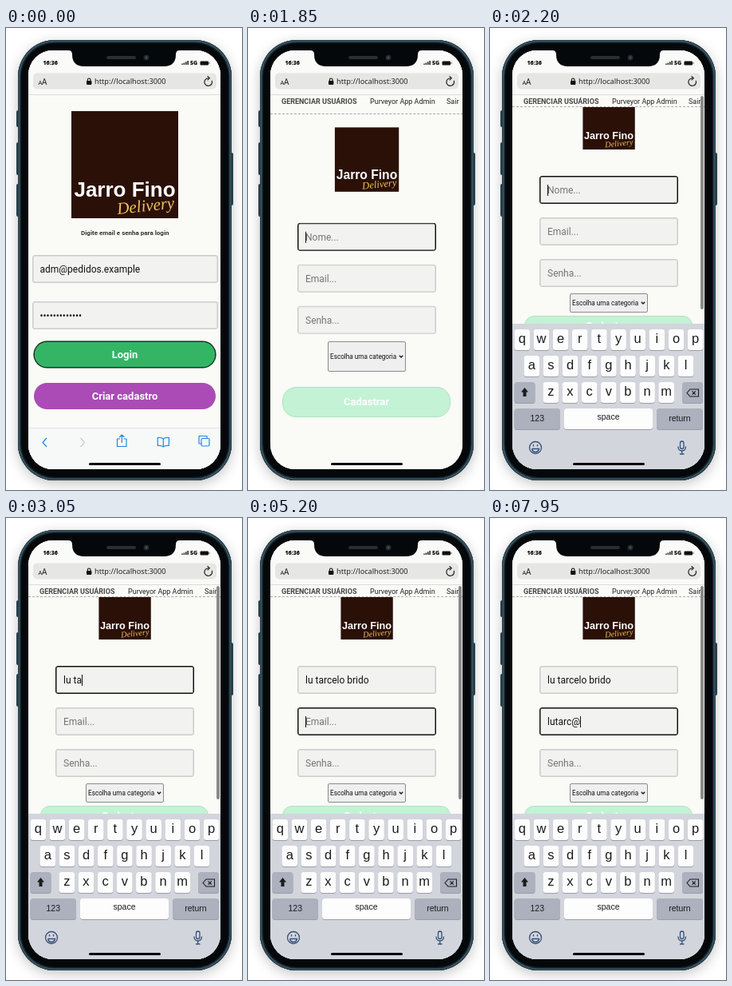
Recreate the animation shown at these times as an HTML page. Size 296 px wide and 578 px high, loop 8 s.

```html
<!DOCTYPE html>
<html lang="pt-BR">
<head>
<meta charset="utf-8">
<title>Cadastro no celular</title>
<style>
html, body { margin: 0; width: 100%; height: 100%; overflow: hidden; background: #fff; }
body { position: relative; font: 12px Roboto, sans-serif; color: #111; }
div, svg { position: absolute; box-sizing: border-box; }
svg { left: 0; top: 0; width: 296px; height: 578px; }
.side { width: 4px; background: #2c4856; border-radius: 2px; }
.body {
  left: 15px; top: 15px; width: 268px; height: 551px; border-radius: 46px; background: #05080a;
  box-shadow: inset 0 0 0 1px #2a3f4a, inset 0 0 0 2.5px #3a5664, inset 0 0 0 4px #14242c,
    0 4px 16px rgba(0, 0, 0, .24);
}
.screen {
  left: 28px; top: 28px; width: 241px; height: 524px;
  border-radius: 31px; overflow: hidden; background: #fafaf7;
}
.stage { left: -28px; top: -28px; width: 296px; height: 578px; }
.page { left: 0; top: 0; width: 296px; height: 578px; background: #fafaf7; }
.text { white-space: pre; line-height: 14px; }
.field {
  --line: #cbcbcd;
  height: 35px; padding-left: 9px; line-height: 34px; white-space: pre;
  border: 1px solid var(--line); border-radius: 3px; background: #f2f2f0;
  box-shadow: inset 0 0 0 .5px var(--line);
}
.wide { left: 32.5px; width: 233px; }
.form .field { left: 62px; width: 174px; }
.field.focus { --line: #111; }
.hint { color: #757575; }
.caret { display: none; border-left: 1px solid #111; margin-right: -1px; height: 14px; vertical-align: -3px; }
.caret.on { display: inline-block; }
.button {
  display: flex; align-items: center; justify-content: center;
  font-weight: 700; font-size: 13px; color: #fff; border-radius: 17px;
}
.login {
  left: 35px; top: 392px; width: 228px; height: 33px; background: #33b565;
  box-shadow: 0 0 0 .6px #111, inset 0 0 0 .7px #111;
}
.create { left: 35px; top: 444px; width: 228px; height: 33px; background: #aa4bb6; }
.save { left: 43px; width: 211px; background: #c3f2d4; border: 1px solid #b0e3c2; overflow: hidden; }
.select {
  left: 100px; width: 98px; padding-left: 2px; display: flex; align-items: center;
  font-size: 8.2px; white-space: nowrap; border: 1px solid #8b8b8b; border-radius: 2px; background: #efefef;
}
.nav {
  left: 28px; top: 84px; width: 242px; background: #fafaf7;
  border-bottom: 1px dashed #aaa; font-size: 9px; color: #222;
}
.bar { left: 264px; top: 85px; width: 4px; border-radius: 2px; background: #8b8b8b; }

/* one percent is 80 ms */
.page.first, .login, .tools, .keys, .nav, .bar, .form, .select, .save, .brand {
  animation: 8s linear infinite;
}
.page.first { animation-name: leave; }
.login { animation-name: press; }
.tools { animation-name: drop; }
.keys { animation-name: rise; }
.nav { animation-name: nav; }
.bar { animation-name: bar; }
.form { animation-name: form; }
.select { animation-name: select; }
.save { animation-name: save; }
.brand { animation-name: brand; }
@keyframes leave { 0%, 17.49% { visibility: visible } 17.5%, 100% { visibility: hidden } }
@keyframes press { 0%, 10% { background: #33b565 } 11.2%, 100% { background: #70c98f } }
@keyframes drop { 0%, 22.5% { transform: none } 23.1%, 100% { transform: translateY(60px) } }
@keyframes rise {
  0%, 23.13% { transform: translateY(184px) }
  23.75% { transform: translateY(110px) }
  24.38% { transform: translateY(55px) }
  25% { transform: translateY(20px) }
  26.25%, 100% { transform: none }
}
@keyframes nav { 0%, 23.13% { height: 24px } 25% { height: 16px } 26.25%, 100% { height: 15px } }
@keyframes bar {
  0%, 23.13% { height: 440px; opacity: 0 }
  23.75% { opacity: 1 }
  25% { height: 293px; opacity: 1 }
  26.25%, 100% { height: 267px; opacity: 1 }
}
@keyframes form {
  0%, 23.13% { transform: none }
  25% { transform: translateY(-46px) }
  26.25%, 100% { transform: translateY(-59px) }
}
@keyframes select {
  0%, 23.13% { top: 392px; height: 38px }
  25% { top: 346px; height: 25px }
  26.25%, 100% { top: 332px; height: 24px }
}
@keyframes save {
  0%, 23.13% { top: 449px; height: 38px }
  25% { top: 375px; height: 26px }
  26.25%, 100% { top: 360px; height: 24px }
}
@keyframes brand {
  0%, 23.13% { transform: translate(149px, 205px) scale(.602) }
  25% { transform: translate(149px, 163px) scale(.527) }
  26.25%, 100% { transform: translate(149px, 152px) scale(.489) }
}
</style>
</head>
<body>
<div class="side" style="left:13px;top:103px;height:21px"></div>
<div class="side" style="left:13px;top:143px;height:41px"></div>
<div class="side" style="left:13px;top:195px;height:41px"></div>
<div class="side" style="left:281px;top:156px;height:66px"></div>
<div class="body"></div>
<div class="screen"><div class="stage">

  <div class="page">
    <svg>
      <defs>
        <g id="logo">
          <rect x="-67" y="-134" width="134" height="134" fill="#2a1007"/>
          <text y="-27" text-anchor="middle" font-family="Liberation Sans, Arial, sans-serif"
            font-weight="700" font-size="26" fill="#fff">Jarro Fino</text>
          <text transform="translate(-9 -5) rotate(-6)" font-family="Liberation Serif, serif"
            font-style="italic" font-size="21" fill="#f3c25a">Delivery</text>
        </g>
      </defs>
      <use class="brand" href="#logo"/>
    </svg>
    <div class="nav">
      <div class="text" style="left:14px;top:1px;font-weight:700;color:#444">GERENCIAR USUÁRIOS</div>
      <div class="text" style="left:125px;top:1px">Purveyor App Admin</div>
      <div class="text" style="left:221px;top:1px">Sair</div>
    </div>
    <div class="form" style="left:0;top:0">
      <div class="field" style="top:244px"><span></span><i class="caret"></i><span class="hint">Nome...</span></div>
      <div class="field" style="top:296px"><span></span><i class="caret"></i><span class="hint">Email...</span></div>
      <div class="field" style="top:348px"><span class="hint">Senha...</span></div>
    </div>
    <div class="select">
      <span>Escolha uma categoria</span>
      <svg style="left:88px;top:calc(50% - 3px);width:6px;height:6px" viewBox="0 0 6 6">
        <path d="M.8 1.8 3 4 5.2 1.8" fill="none" stroke="#111" stroke-width="1.3"/></svg>
    </div>
    <div class="button save">Cadastrar</div>
    <div class="bar"></div>
  </div>

  <div class="page first">
    <svg><use href="#logo" transform="translate(149 238)"/></svg>
    <div class="text" style="left:94px;top:250px;font-size:8px;font-weight:700;color:#333">Digite email e senha para login</div>
    <div class="field wide" style="top:284px">adm@pedidos.example</div>
    <div class="field wide" style="top:342px">•••••••••••••</div>
    <div class="button login">Login</div>
    <div class="button create">Criar cadastro</div>
  </div>

  <svg>
    <path d="M28 28H270V83H28Z" fill="#fafaf8"/>
    <path d="M28 83.5H270" stroke="#dcdcdc"/>
    <path d="M78 28H218Q213 28 213 33Q213 48 198 48H98Q83 48 83 33Q83 28 78 28Z" fill="#05080a"/>
    <rect x="126" y="35" width="37" height="4" rx="2" fill="#2b2d30"/>
    <circle cx="176" cy="37" r="3.5" fill="#23282f"/><circle cx="176" cy="37" r="1.4" fill="#46505e"/>
    <g font-family="Open Sans, sans-serif" font-weight="800" font-size="7" fill="#111">
      <text x="46.5" y="46">16:36</text><text x="231" y="46">5G</text>
    </g>
    <path d="M221 46v-1.5M223.4 46v-2.5M225.8 46v-3.7M228.2 46v-5" stroke="#222" stroke-width="1.5"/>
    <rect x="243.5" y="41.5" width="10.5" height="5" rx="1.2" fill="#111"/><path d="M255 43v2" stroke="#555"/>
    <g transform="translate(0 -.6)">
      <rect x="34" y="57" width="230" height="20" rx="5" fill="#e6e6e5"/>
      <g font-family="Noto Sans, sans-serif" fill="#222">
        <text x="40.5" y="71.5" font-size="7.5">A</text><text x="45" y="71.5" font-size="10">A</text>
        <text x="111" y="71" font-size="9.2">http://localhost:3000</text>
      </g>
      <rect x="101" y="66.5" width="6.4" height="5" rx=".8" fill="#111"/>
      <path d="M102.4 67v-1.6a1.8 1.8 0 0 1 3.6 0v1.6" fill="none" stroke="#111" stroke-width="1.1"/>
      <path d="M258.2 66.500a4.8 4.8 0 1 1-4.400-3.100h1" fill="none" stroke="#222" stroke-width="1.2"/>
      <path d="M252.6 60.8 255.4 63.4 252.6 66" fill="none" stroke="#222" stroke-width="1.1"/>
    </g>
  </svg>

  <svg class="tools">
    <path d="M28 500H270V560H28Z" fill="#f7f8f8"/><path d="M28 500.5H270" stroke="#e2e3e4"/>
    <g transform="translate(0 -1)" fill="none" stroke="#2187e2" stroke-width="1.2" stroke-linejoin="round">
      <path d="M51 514 46 519.5 51 525"/>
      <path d="M93.5 514 98.500 519.5 93.5 525" stroke="#c9cbce"/>
      <path d="M143 515h-3.5v9.5h11.5V515h-3.5M145.300 520v-9.5M142.300 513l3-3 3 3"/>
      <path d="M197.300 515q-2.5-2-7-1.5v10q4.500-.5 7 1.500 2.500-2 7-1.500v-10q-4.500-.5-7 1.500v10"/>
      <rect x="245" y="514.5" width="10" height="9.5" rx="1.5"/>
      <path d="M245 521h-3v-9.5h10v3"/>
    </g>
  </svg>

  <svg class="keys" id="keys"><path d="M28 370H270V560H28Z" fill="#d3d5dc"/></svg>
  <svg><rect x="104" y="544" width="90" height="3" rx="1.5" fill="#050505"/></svg>
</div></div>

<script>
const board = document.getElementById('keys');
const grey = '#adb0bd';

const key = (x, y, w, label, size, fill = '#fdfdfd') => `
  <rect x="${x}" y="${y + 1}" width="${w}" height="26" rx="3.5" fill="#9a9da6"/>
  <rect x="${x}" y="${y}" width="${w}" height="26" rx="3.5" fill="${fill}"/>
  <text x="${x + w / 2}" y="${y + (size > 12 ? 17 : 16)}" font-size="${size}">${label}</text>`;

const row = (letters, x, y) =>
  [...letters].map((c, i) => key(x + i * 24.15, y, 19.6, c, 16.5)).join('');

board.innerHTML += `
  <g font-family="Liberation Sans, Arial, sans-serif" text-anchor="middle" fill="#1b1b1f">
    ${row('qwertyuiop', 30.5, 377)}${row('asdfghjkl', 42.5, 410)}${row('zxcvbnm', 66.5, 443)}
    ${key(30.5, 443, 26, '', 12, grey)}${key(241, 443, 26, '', 12, grey)}
    ${key(30.5, 476, 57.5, '123', 10.5, grey)}${key(93, 476, 111, '', 10.5)}
    ${key(209, 476, 58, 'return', 10.5, grey)}
    <text x="148.5" y="490" font-size="10.5">space</text>
  </g>
  <path d="M43.5 450 48 455.5H45.5V461H41.5V455.5H39Z" fill="#1b1b1f"/>
  <path d="M247 456.5 251 452H261.5V461H251ZM253.5 454.3l4.4 4.4m0-4.4-4.4 4.4"
    fill="none" stroke="#1b1b1f" stroke-width="1.1"/>
  <g fill="none" stroke="#35507a" stroke-width="1.3">
    <circle cx="57" cy="525" r="7.5"/>
    <path d="M52.5 526.5h9q-.8 4-4.5 4t-4.5-4M54.5 521v2.5M59.5 521v2.5"/>
    <rect x="238.5" y="517" width="4.5" height="9.5" rx="2.25"/>
    <path d="M236 523.5q0 5.5 4.75 5.5t4.75-5.5M240.75 529v4M238 533h5.5"/>
  </g>`;

const entries = [
  { from: 1800, to: 5200, text: 'lu tarcelo brido',
    at: [2450, 2600, 2750, 2900, 3050, 3200, 3500, 3800, 4050, 4200, 4300, 4450, 4750, 4850, 4950, 5050] },
  { from: 5200, to: 8000, text: 'lutarc@', at: [6450, 6700, 6900, 7100, 7350, 7600, 7950] }
];
const fields = document.querySelectorAll('.form .field');
const blinkOff = t => t >= 5600 && t < 6100;

function draw(t) {
  entries.forEach((entry, i) => {
    const [typed, caret, hint] = fields[i].children;
    const count = entry.at.filter(ms => ms <= t).length;
    const active = t >= entry.from && t < entry.to;
    typed.textContent = entry.text.slice(0, count);
    hint.hidden = count > 0;
    fields[i].classList.toggle('focus', active);
    caret.classList.toggle('on', active && !blinkOff(t));
  });
}

let start;
function tick(now) {
  start ??= now;
  draw((now - start) % 8000);
  requestAnimationFrame(tick);
}
requestAnimationFrame(tick);
</script>
</body>
</html>
```
